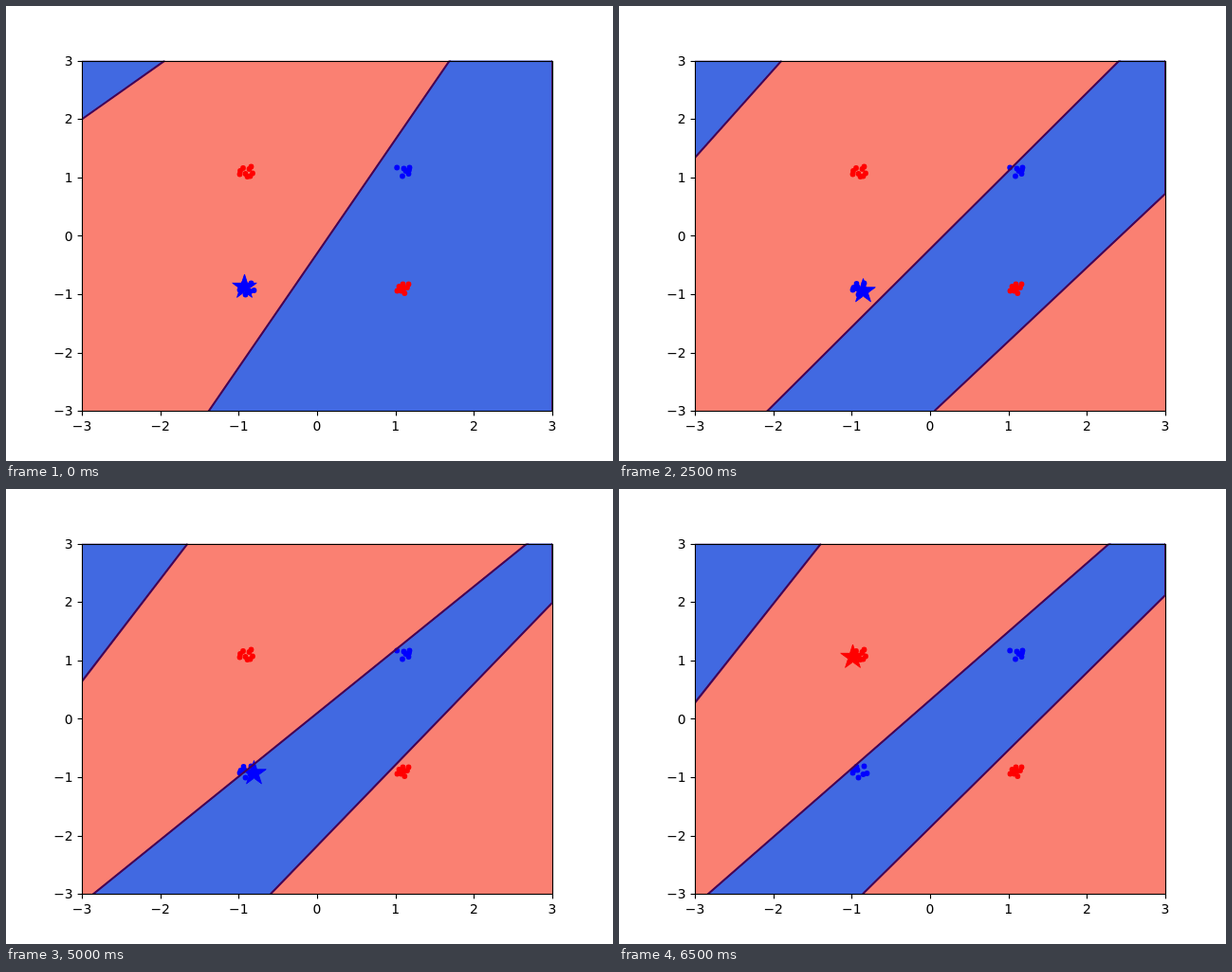
An HTML page with a canvas for the animation above (7000 ms loop, 640 by 480 pixels).

```html
<!DOCTYPE html>
<html lang="en">
<head>
<meta charset="utf-8">
<title>Decision boundary training</title>
<style>
  html, body { margin: 0; width: 100%; height: 100%; overflow: hidden; background: #fff; }
  canvas { display: block; }
</style>
</head>
<body>
<canvas id="stage" width="640" height="480"></canvas>
<script>
const ctx = document.getElementById('stage').getContext('2d');
const LEFT = 80, RIGHT = 576, TOP = 57.6, BOTTOM = 427.2;
const STEP_MS = 500;
const RED = '#ff0000', BLUE = '#0000ff';

// Four clusters of samples, in stage pixels.
const clusters = {
  redTop: { color: RED, points: [[246.5, 177.5], [247, 174], [250, 171], [258.5, 169.5], [256.5, 172], [252.5, 177], [260, 176.5], [254.5, 180], [257.5, 179.5]] },
  blueTop: { color: BLUE, points: [[412.2, 170.5], [419.5, 171.5], [425.5, 170.5], [424.5, 177], [418, 179.5], [421.5, 174], [425, 173]] },
  blueLow: { color: BLUE, points: [[251.5, 296.5], [257.5, 301], [250.5, 293], [258.5, 292.5], [246.5, 299.5], [247.5, 297], [261.5, 300], [252.5, 304.5]] },
  redLow: { color: RED, points: [[420.3, 303], [412.5, 300.5], [414.5, 296], [418.5, 293.5], [424.5, 293.5], [423, 297], [419.5, 297.5], [416.5, 300.5]] }
};

// Each step: corner line (x at top, y at left), main line (y at left, y at right),
// lower line (x at bottom, y at right), then the cluster and index of the active sample.
const steps = [
  [167.5, 119.5, 622, -100, 610, 440, 'blueLow', 0],
  [169.5, 137, 546, -45.5, 610, 440, 'redLow', 3],
  [169.5, 137, 558, -45, 510, 382, 'redLow', 0],
  [169.5, 137, 567, -42, 385, 288, 'blueLow', 4],
  [171.5, 160, 497.4, 7.2, 408, 263, 'redLow', 2],
  [171.5, 160, 503.4, 9.3, 332.5, 198, 'blueLow', 1],
  [170, 186, 443.6, 55.3, 357, 175, 'redLow', 6],
  [170, 186, 444.8, 57.8, 313, 131, 'blueLow', 2],
  [172.5, 225.5, 392, 89, 335, 104, 'redLow', 1],
  [172.5, 225.5, 396.5, 97, 297, 77, 'blueTop', 0],
  [191.5, 203, 437, 36, 279, 120, 'blueLow', 6],
  [191.5, 249.5, 386.5, 76, 303, 97, 'blueTop', 1],
  [213, 225.5, 434, 3, 285, 140, 'redLow', 5],
  [213, 225.5, 439.4, 6, 257, 112, 'redTop', 0]
];

function trace(points) {
  ctx.beginPath();
  for (const [x, y] of points) ctx.lineTo(x, y);
}

function fill(points, color) {
  trace(points);
  ctx.fillStyle = color;
  ctx.fill();
}

function drawStar([cx, cy], color) {
  const points = Array.from({ length: 10 }, (_, i) => {
    const radius = i % 2 ? 5.1 : 13.4, angle = i * Math.PI / 5;
    return [cx + radius * Math.sin(angle), cy - radius * Math.cos(angle)];
  });
  fill(points, color);
  ctx.closePath();
  ctx.strokeStyle = color;
  ctx.lineWidth = 1;
  ctx.lineJoin = 'bevel';
  ctx.stroke();
}

function drawSamples(active, index) {
  for (const { color, points } of Object.values(clusters)) {
    ctx.fillStyle = color;
    for (const [x, y] of points) {
      ctx.beginPath();
      ctx.arc(x, y, 2.9, 0, 2 * Math.PI);
      ctx.fill();
    }
  }
  drawStar(clusters[active].points[index], clusters[active].color);
}

function drawPlot([cornerX, cornerY, mainL, mainR, lowX, lowR, active, index]) {
  let endX = RIGHT, mainEnd = mainR, lowEnd = lowR;
  if (lowR < mainR) { // the two lines meet inside the axes
    const mainSlope = (mainR - mainL) / (RIGHT - LEFT);
    const lowSlope = (lowR - BOTTOM) / (RIGHT - lowX);
    endX = (BOTTOM - lowX * lowSlope - mainL + LEFT * mainSlope) / (mainSlope - lowSlope);
    mainEnd = lowEnd = mainL + (endX - LEFT) * mainSlope;
  }
  const corner = [[LEFT, cornerY], [cornerX, TOP]];
  const main = [[LEFT, mainL], [endX, mainEnd]];
  const low = [[endX, lowEnd], [lowX, BOTTOM]];

  ctx.save();
  ctx.beginPath();
  ctx.rect(LEFT, TOP, RIGHT - LEFT, BOTTOM - TOP);
  ctx.clip();
  ctx.fillStyle = '#fa8072';
  ctx.fillRect(LEFT, TOP, RIGHT - LEFT, BOTTOM - TOP);
  fill([...corner, [LEFT, TOP]], '#4169e1');
  fill([...main, ...low, [LEFT, BOTTOM]], '#4169e1');
  drawSamples(active, index);
  ctx.strokeStyle = '#440154';
  ctx.lineWidth = 2.08;
  ctx.lineJoin = 'round';
  trace(corner);
  ctx.stroke();
  trace([...main, ...low]);
  ctx.stroke();
  ctx.restore();
}

function drawAxes() {
  ctx.strokeStyle = ctx.fillStyle = '#000';
  ctx.lineWidth = 1.11;
  ctx.lineJoin = 'miter';
  ctx.strokeRect(80.5, 58.5, 496, 369);
  ctx.font = '13.89px "DejaVu Sans", sans-serif';
  for (let i = 0; i <= 6; i++) {
    const x = LEFT + i * (RIGHT - LEFT) / 6;
    const y = BOTTOM - i * (BOTTOM - TOP) / 6;
    const tickX = Math.round(x) + 0.5, tickY = Math.round(y) + 0.5;
    const label = String(i - 3).replace('-', '\u2212');
    trace([[tickX, 428], [tickX, 432.4]]);
    ctx.stroke();
    trace([[75.6, tickY], [80, tickY]]);
    ctx.stroke();
    ctx.textAlign = 'center';
    ctx.fillText(label, x, 448);
    ctx.textAlign = 'right';
    ctx.fillText(label, 70.6, Math.round(y + 5.2));
  }
}

function render() {
  const step = Math.floor(performance.now() / STEP_MS) % steps.length;
  ctx.fillStyle = '#fff';
  ctx.fillRect(0, 0, 640, 480);
  drawPlot(steps[step]);
  drawAxes();
  requestAnimationFrame(render);
}
render();
</script>
</body>
</html>
```
